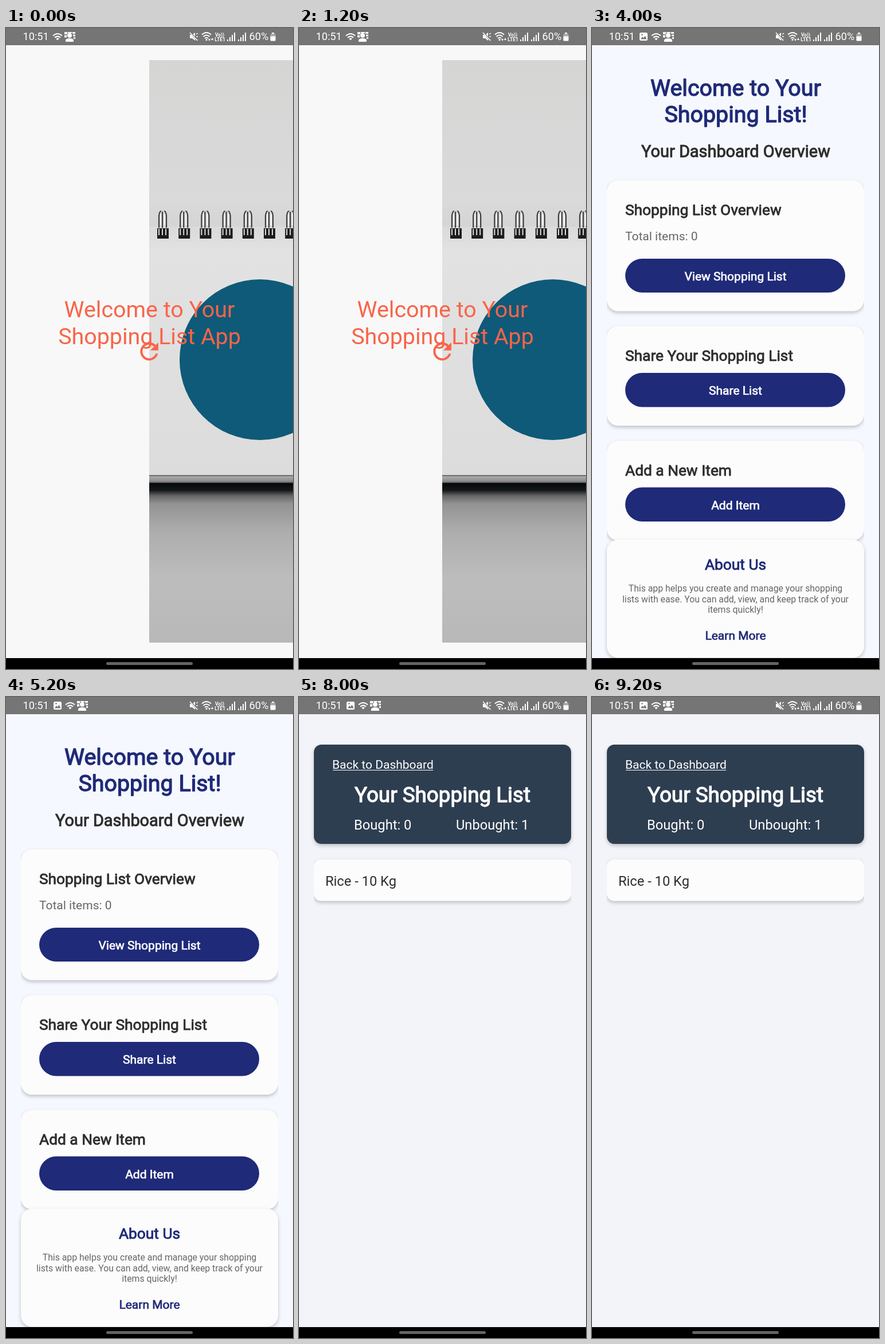
An HTML page for the animation above (10 s loop, 501 by 1117 pixels).

```html
<!DOCTYPE html>
<html lang="en">
<head>
<meta charset="utf-8">
<title>Shopping list app</title>
<style>
  html, body { margin: 0; width: 100%; height: 100%; overflow: hidden; background: #fafafa; }
  svg { display: block; width: 501px; height: 1117px; font-family: Roboto, sans-serif; }
  .screen { display: none; }
  .screen.on { display: inline; }
  .xxl { font-size: 39.4px; } .xl { font-size: 36.8px; } .lg { font-size: 28.9px; } .h { font-size: 26.3px; }
  .b { font-size: 23.7px; } .m { font-size: 21px; } .s { font-size: 18.4px; } .xs { font-size: 15.8px; }
  .c { text-anchor: middle; }
  .bold { stroke-width: .034em; stroke-linejoin: round; }
  .white { fill: #fff; stroke: #fff; }
  .navy { fill: #1f2a78; stroke: #1f2a78; }
  .blue { fill: #4a90e2; stroke: #4a90e2; }
  .dark { fill: #2e2e2e; stroke: #2e2e2e; }
  .plain { stroke: none; }
  .grey { fill: #666; }
  .card { fill: #fcfcfc; filter: drop-shadow(0 3px 3px rgba(0, 0, 0, .22)); }
  .raised { fill: #4a90e2; filter: drop-shadow(0 5px 4px rgba(0, 0, 0, .25)); }
  .field { fill: #fcfcfc; stroke: #dadada; stroke-width: 1.3; }
  .arc { fill: none; stroke: #fff; stroke-width: 2; }
</style>
</head>
<body>
<svg viewBox="0 0 501 1117">
  <defs>
    <linearGradient id="wall" x2="0" y2="1">
      <stop stop-color="#d5d5d4"/><stop offset=".24" stop-color="#dadada"/><stop offset=".28" stop-color="#d5d5d5"/>
    </linearGradient>
    <linearGradient id="page" x2="0" y2="1">
      <stop stop-color="#dadada"/><stop offset=".1" stop-color="#e2e2e2"/><stop offset="1" stop-color="#dcdcdc"/>
    </linearGradient>
    <linearGradient id="edge" x2="0" y2="1">
      <stop stop-color="#555"/><stop offset=".2" stop-color="#aaa"/><stop offset=".75" stop-color="#898989"/><stop offset="1" stop-color="#222"/>
    </linearGradient>
    <linearGradient id="desk" x2="0" y2="1">
      <stop stop-color="#050708"/><stop offset=".045" stop-color="#14181a"/><stop offset=".08" stop-color="#666"/>
      <stop offset=".13" stop-color="#939393"/><stop offset=".3" stop-color="#adadad"/><stop offset=".6" stop-color="#bdbdbd"/><stop offset="1" stop-color="#b8b8b8"/>
    </linearGradient>
    <linearGradient id="photo" y2="1">
      <stop stop-color="#ebebeb"/><stop offset=".45" stop-color="#d9d9d9"/><stop offset="1" stop-color="#b9b9b9"/>
    </linearGradient>
    <clipPath id="column"><path d="M26 0h449v1117H26z"/></clipPath>
    <g id="ring">
      <path d="M-10 349h20v18h-20z" fill="#1b1c1c"/>
      <path d="M-7 350v11M-1 350v11M5 350v11" stroke="#ddd" stroke-width="2"/>
      <path d="M-7 348V327q1-8 4-8M-1 348V320M6 348V327q-1-8-4-8" fill="none" stroke="#3c3f3d" stroke-width="2.2"/>
      <path d="M-4 344V324M3 344V324" stroke="#f4f4f4" stroke-width="2"/>
    </g>
    <g id="wifi">
      <path class="arc" d="M-8 13.5q8-7 16 0M-5 16.7q5-4.200 10 0"/>
      <path d="M-2.800 18.500q2.800-2 5.600 0L0 21.500z" fill="#fff"/>
    </g>
    <g id="contact" fill="#fff">
      <path d="M-9 7h5v4h-5zM-9 12.500h4v4h-4zM5 7h5v3H5zM6 11.500h4v3H6zM7 16h3v3H7z"/>
      <path d="M-3 7H4V9H-3z"/>
      <circle cy="13" r="4"/><path d="M-7 24v-3q1-3 7-3t7 3v3z"/>
    </g>
    <path id="bars" d="M-6 23v-3M-2 23v-7M2 23V12M6 23V8" stroke="#fff" stroke-width="2"/>
  </defs>

  <g class="screen">
    <path fill="#f8f8f8" d="M0 0h501v1117H0z"/>
    <path fill="url(#wall)" d="M250 56h251v1015H250z"/>
    <path fill="url(#page)" d="M250 346h251v434H250z"/>
    <path fill="url(#edge)" d="M250 779h251v15H250z"/>
    <path fill="url(#desk)" d="M250 793h251v278H250z"/>
    <g id="rings"></g>
    <circle cx="443" cy="578" r="140" fill="#0e5a78"/>
    <g class="xxl c" fill="#fa6449">
      <text x="250.500" y="504">Welcome to Your</text>
      <text x="250.500" y="550.500">Shopping List App</text>
      <path transform="translate(226.500 540) scale(1.970)" d="M17.650 6.350C16.200 4.900 14.210 4 12 4c-4.420 0-8 3.580-8 8s3.580 8 8 8c3.730 0 6.840-2.550 7.730-6h-2.080c-.820 2.330-3.040 4-5.650 4-3.310 0-6-2.690-6-6s2.690-6 6-6c1.660 0 3.140.690 4.220 1.780L13 11h7V4z"/>
    </g>
  </g>

  <g class="screen">
    <path fill="#f9f9f9" d="M0 0h501v1117H0z"/>
    <path fill="url(#photo)" d="M152.500 388h196v195.500h-196z"/>
    <circle cx="249.500" cy="485" r="50" fill="#c9201c"/>
    <text class="m c" fill="#808080" x="250.500" y="632">Manage your shopping items effortlessly</text>
    <rect class="raised" x="122.500" y="677" width="256" height="63" rx="31.500"/>
    <text class="b c bold white" x="250.500" y="718">Go to Dashboard</text>
  </g>

  <g class="screen">
    <path fill="#f5f8fe" d="M0 0h501v1117H0z"/>
    <g class="xxl c bold navy">
      <text x="251" y="118">Welcome to Your</text>
      <text x="251" y="164">Shopping List!</text>
    </g>
    <text class="lg c bold dark" x="251" y="225">Your Dashboard Overview</text>
    <g clip-path="url(#column)">
      <rect class="card" x="26" y="265.500" width="449" height="228" rx="20"/>
      <rect class="card" x="26" y="519.500" width="449" height="173.500" rx="20"/>
      <rect class="card" x="26" y="719.500" width="449" height="173.500" rx="20"/>
    </g>
    <rect class="card" x="26" y="891.500" width="449" height="206" rx="20"/>
    <g class="h bold dark">
      <text x="58" y="326">Shopping List Overview</text>
      <text x="58" y="580">Share Your Shopping List</text>
      <text x="58" y="780">Add a New Item</text>
    </g>
    <text class="m grey" x="58" y="369.500">Total items: 0</text>
    <g fill="#1f2a78">
      <rect x="58" y="402" width="384" height="59" rx="29.500"/>
      <rect x="58" y="601" width="384" height="59.500" rx="29.500"/>
      <rect x="58" y="800.500" width="384" height="59.500" rx="29.500"/>
    </g>
    <g class="m c bold white">
      <text x="250.500" y="440">View Shopping List</text>
      <text x="250.500" y="639">Share List</text>
      <text x="250.500" y="839">Add Item</text>
    </g>
    <text class="h c bold navy" x="250.500" y="944">About Us</text>
    <g class="xs c grey">
      <text x="250.500" y="982">This app helps you create and manage your shopping</text>
      <text x="250.500" y="1000.500">lists with ease. You can add, view, and keep track of your</text>
      <text x="250.500" y="1019">items quickly!</text>
    </g>
    <text class="m c bold navy" x="250.500" y="1066">Learn More</text>
  </g>

  <g class="screen">
    <path fill="#fafafa" d="M0 0h501v1117H0z"/>
    <text class="xl c bold blue" x="251" y="369">Add a New Item</text>
    <rect class="field" x="71.500" y="405.500" width="358" height="69" rx="10"/>
    <rect class="field" x="71.500" y="502" width="358" height="69" rx="10"/>
    <g class="s" fill="#1c1c1c">
      <text x="86" y="447.500">Rice</text>
      <text x="86" y="544">10</text>
    </g>
    <text class="m c dark plain" x="250.500" y="619.500">Select Unit</text>
    <path fill="#fcfcfc" d="M71 639h359v70H71z"/>
    <text class="m" x="81" y="682">Kg</text>
    <path class="grey" d="M392 671h14l-7 7z"/>
    <rect class="raised" x="163" y="735" width="175" height="63" rx="31.500"/>
    <text class="b c bold white" x="250.500" y="775.500">Add Item</text>
  </g>

  <g class="screen">
    <path fill="#f3f4f9" d="M0 0h501v1117H0z"/>
    <rect class="card" style="fill:#2e3e51" x="26" y="83" width="449" height="173" rx="13"/>
    <text class="m white plain" x="58" y="124.500">Back to Dashboard</text>
    <path d="M59 127.500h175" stroke="#fff" stroke-width="1.200"/>
    <text class="xl c bold white" x="250.500" y="182.500">Your Shopping List</text>
    <g class="b white plain">
      <text x="96" y="231">Bought: 0</text>
      <text x="274" y="231">Unbought: 1</text>
    </g>
    <g clip-path="url(#column)">
      <rect class="card" x="26" y="283" width="449" height="72.500" rx="13"/>
    </g>
    <text class="b dark plain" x="46" y="328.500">Rice - 10 Kg</text>
  </g>

  <!-- status bar -->
  <path fill="#757575" d="M0 0h501v30H0z"/>
  <g fill="#fff">
    <g font-size="18.200">
      <text x="29.500" y="21">10:51</text>
      <text x="424.500" y="21">60%</text>
    </g>
    <g id="picture">
      <rect x="83" y="8" width="14" height="14" rx="2.500"/>
      <path fill="#757575" d="M85 19.500l3-4.500 2 2.500 2.500-4 3 6z"/><circle cx="87.500" cy="11.500" r="1.300" fill="#757575"/>
    </g>
    <g id="notices">
      <use href="#wifi" x="90"/>
      <use href="#contact" x="111"/>
    </g>
    <path d="M321 12h4l5-4v14l-5-4h-4z"/>
    <path d="M332 11l3-2M332 15h3M332 19l3 2" stroke="#fff" stroke-width="1.500"/>
    <path d="M322 8l12 14" stroke="#757575" stroke-width="3"/><path d="M321 8l13 14" stroke="#fff" stroke-width="1.500"/>
    <path class="arc" d="M342 11.500q8-7 16 0M344.500 15q5.500-5 11 0M347 18q3-2.600 6 0"/>
    <circle cx="350" cy="20.500" r="1.600"/>
    <path d="M353 19h4l-2 4zM358 21h4l-2-4z"/>
    <g class="c" font-weight="700" font-size="8.500">
      <text x="373" y="14.500">Vo))</text>
      <text x="373.500" y="23">LTE1</text>
    </g>
    <use href="#bars" x="393"/>
    <use href="#bars" x="412"/>
    <rect x="461.500" y="10" width="9" height="12.500" rx="1.500" fill="#aaa"/>
    <path d="M464 8h4v2h-4zM461.500 14.500h9v6.500q0 1.500-1.500 1.500h-6q-1.500 0-1.500-1.500z"/>
  </g>
  <!-- navigation bar -->
  <path d="M0 1098h501v19H0z"/>
  <rect x="175" y="1105" width="151" height="5" rx="2.500" fill="#646464"/>
</svg>
<script>
  const HOLD = 2000;
  const $ = id => document.getElementById(id);
  const screens = [...document.querySelectorAll('.screen')];

  $('rings').innerHTML = Array.from({ length: 7 }, (_, i) => `<use href="#ring" x="${274 + i * 37.2}"/>`).join('');

  function show(now) {
    const step = Math.floor(now / HOLD) % screens.length;
    screens.forEach((screen, i) => screen.classList.toggle('on', i === step));
    // the picture notice appears after the splash screen and pushes the others right
    $('picture').style.display = step ? '' : 'none';
    $('notices').setAttribute('transform', `translate(${step ? 22 : 0})`);
  }

  const start = performance.now();
  function tick() {
    show(performance.now() - start);
    requestAnimationFrame(tick);
  }
  tick();
</script>
</body>
</html>
```
